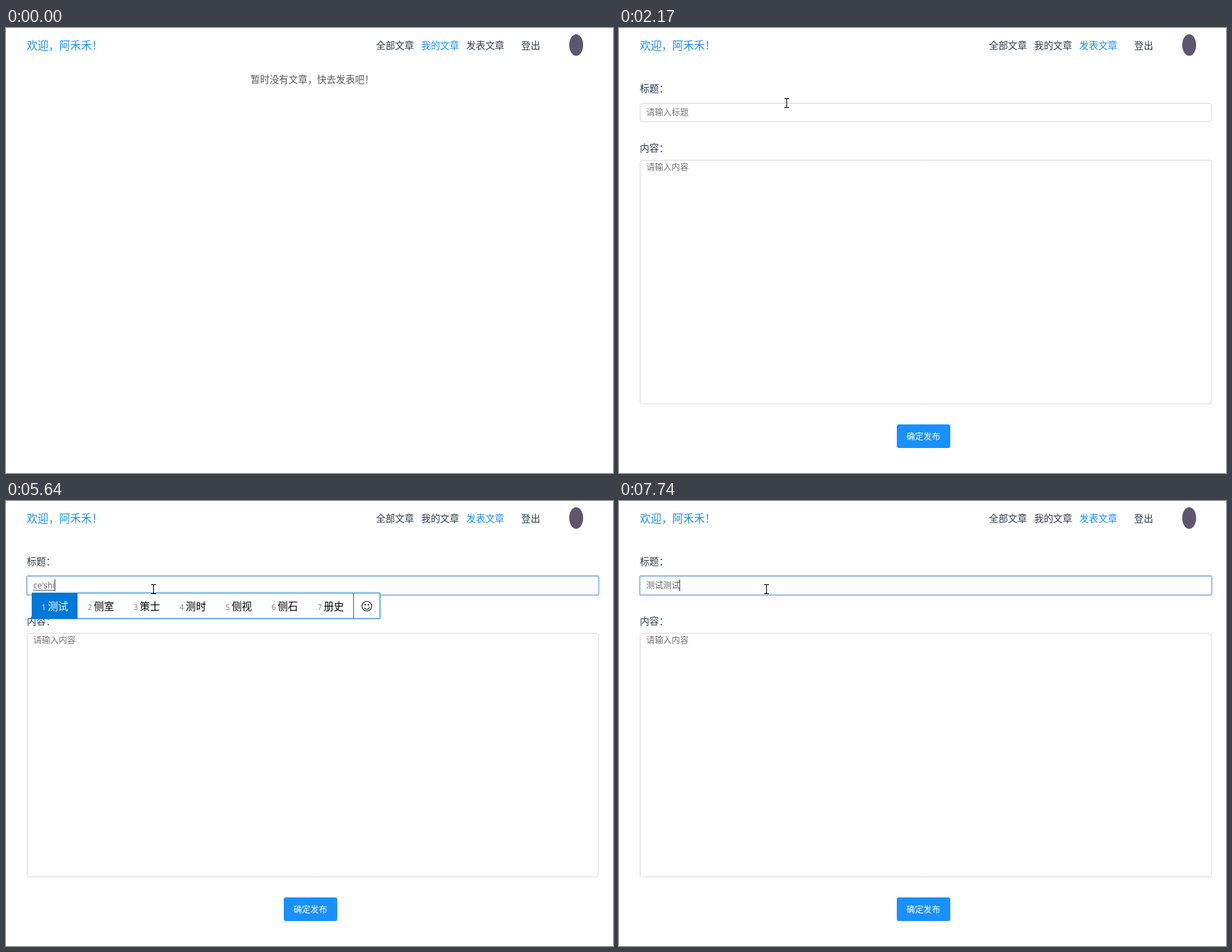
An HTML page with a canvas that plays this animation: 874x641 px, repeating every 8 s.

```html
<!DOCTYPE html>
<html lang="zh-CN">
<head>
<meta charset="utf-8">
<title>发表文章</title>
<style>
html, body { margin: 0; width: 100%; height: 100%; overflow: hidden; background: #fff; }
canvas { display: block; width: 874px; height: 641px; }
</style>
</head>
<body>
<canvas id="stage" width="874" height="641"></canvas>
<script>
const ctx = document.getElementById('stage').getContext('2d');
const LOOP = 8000;
const CJK = '"Noto Sans CJK SC", "Noto Sans CJK", sans-serif';
const LATIN = '"Open Sans", "Noto Sans CJK SC", sans-serif';
const BLUE = '#1890ff', DARK = '#2c3e50', GREY = '#757575', IME_BLUE = '#0078d7';

const BODY = 13.7, SMALL = 12.2, CAND = 14.6;
const FIELD_X = 39.2, NAV_Y = 25;

const ONE = [...'从才成吃出次错'];
const CE = [...'测侧册策厕恻齰'];
const CE_S = '测试 厕所 测算 侧身 测速 策士 侧室'.split(' ');
const CE_SH = '测试 侧身 策士 侧室 测时 侧视 册数'.split(' ');
const CE_SHI = '测试 侧室 策士 测时 侧视 侧石 册史'.split(' ');

// start time, committed text, text being composed, candidates
const TYPING = [
  [0, '', '', null],
  [3950, '', 'c', ONE],
  [4940, '', 'ce', CE],
  [5110, '', "ce's", CE],
  [5180, '', "ce's", CE_S],
  [5500, '', "ce'sh", CE_SH],
  [5640, '', "ce'shi", CE_SHI],
  [5960, '测试', '', null],
  [6970, '测试', 'c', ONE],
  [7110, '测试', 'ce', CE],
  [7360, '测试', "ce's", CE_S],
  [7740, '测试测试', '', null]
];
const CARET_OFF = [[3090, 3620], [4480, 4940], [6500, 6970]];

const within = (t, a, b) => t >= a && t < b;

// y is the visual middle of the line
function text(str, x, y, size, color, family = CJK) {
  ctx.font = `${size}px ${family}`;
  ctx.fillStyle = color;
  ctx.fillText(str, x, Math.round(y + size * 0.38));
  return ctx.measureText(str).width;
}

function rect(x, y, w, h, color) {
  ctx.fillStyle = color;
  ctx.fillRect(x, y, w, h);
}

function frame(x, y, w, h, r, color, line) {
  ctx.beginPath();
  ctx.roundRect(x, y, w, h, r);
  ctx.strokeStyle = color;
  ctx.lineWidth = line;
  ctx.stroke();
}

function header(onForm, hover) {
  text('欢迎，阿禾禾！', 30, 25.5, 15.6, BLUE);
  text('全部文章', 532.7, NAV_Y, BODY, DARK);
  text('我的文章', 597.7, NAV_Y, BODY, onForm ? DARK : BLUE);
  text('发表文章', 662.8, NAV_Y, BODY, onForm || hover ? BLUE : DARK);
  text('登出', 741.8, NAV_Y, BODY, DARK);
  ctx.beginPath();
  ctx.ellipse(821, 24.5, 10, 15.5, 0, 0, Math.PI * 2);
  ctx.fillStyle = '#5d566e';
  ctx.fill();
}

function candidates(list, x) {
  const itemW = 37 + CAND * list[0].length;
  const y = 132, h = 38;
  const sep = Math.round(x + itemW * list.length);
  const w = sep - x + 39;
  rect(x, y, w, h, '#fff');
  frame(x + 0.5, y + 0.5, w - 1, h - 1, 0, IME_BLUE, 1);
  rect(x, y, Math.round(itemW), h, IME_BLUE);
  list.forEach((word, i) => {
    const left = x + i * itemW;
    text(i + 1, left + 14.5, 153, 10.5, i ? GREY : '#fff', LATIN);
    text(word, left + 23.2, 151.5, CAND, i ? '#000' : '#fff');
  });
  rect(sep, y, 1, h, IME_BLUE);

  const cx = sep + 19.5, cy = 151.5;
  ctx.strokeStyle = '#222';
  ctx.lineWidth = 1.2;
  ctx.beginPath();
  ctx.arc(cx, cy, 7, 0, Math.PI * 2);
  ctx.moveTo(cx + 3.6, cy + 2);
  ctx.arc(cx, cy + 0.6, 3.9, 0.36, Math.PI - 0.36);
  ctx.stroke();
  rect(cx - 3.3, cy - 3, 2, 2, '#222');
  rect(cx + 1.3, cy - 3, 2, 2, '#222');
}

function form(t) {
  const focus = t >= 2540;
  text('标题：', 30, 87, BODY, DARK);
  text('内容：', 30, 173, BODY, DARK);
  if (focus) frame(30, 108, 823.5, 27.5, 2, '#94b8ef', 1.8);
  else frame(30.5, 108.5, 822.5, 26.5, 3, '#d9d9d9', 1);
  frame(30.5, 190.5, 822.5, 351, 3, '#d9d9d9', 1);
  text('请输入内容', FIELD_X, 200.8, SMALL, GREY);

  ctx.beginPath();
  ctx.roundRect(400, 571, 77, 34, 3);
  ctx.fillStyle = BLUE;
  ctx.fill();
  text('确定发布', 414, 588.7, SMALL, '#fff');

  const [, done, comp, list] = TYPING.findLast(s => t >= s[0]);
  let x = FIELD_X;
  if (!done && !comp) text('请输入标题', x, 121.8, SMALL, GREY);
  if (done) x += text(done, x, 121.8, SMALL, '#666');
  const imeX = Math.floor(x) - 2;
  if (comp) {
    const w = text(comp, x, 121.8, SMALL, '#666', LATIN);
    rect(Math.floor(x), 128, Math.round(w), 1, '#666');
    x += w;
  }
  if (focus && !CARET_OFF.some(([a, b]) => within(t, a, b)))
    rect(Math.floor(x), 113, 1, 17, '#444');
  if (list) candidates(list, imeX);
}

// The pointer advances in discrete steps, like a screen recording.
function pointer(t) {
  const step = (start, len, last) => Math.min(last, Math.floor((t - start) / len)) / last;
  if (t < 1690) {
    const k = 1 - step(440, 79, 10);
    return { x: 693 + 113 * k ** 1.6, y: 31 + 597 * k ** 2 };
  }
  const k = 1 - step(1690, 77.7, 9);
  return { x: 212 + 481 * k ** 2.56, y: 127 - 96 * k ** 1.47 };
}

const ARROW = new Path2D('M.5 .5V16.5L4.2 13L6.7 18.8L9.3 17.7L6.8 12H11.8Z');
const HAND = new Path2D('M4.5 12V2a1.5 1.5 0 0 1 3 0V8a1.4 1.4 0 0 1 2.7 .3' +
  'a1.4 1.4 0 0 1 2.6 .6a1.3 1.3 0 0 1 2.4 1V14.5C15.2 16.5 13.8 17.5 13.6 19.8' +
  'H5.8C5.4 17 2.2 14.8 1 12.2C.2 10.2 2 9.3 3.2 10.6Z');
const KNUCKLES = new Path2D('M7.5 8V10.8M10.2 8.5V11M12.8 9V11.3');

function cursor(p, kind) {
  ctx.save();
  ctx.translate(Math.round(p.x), Math.round(p.y));
  ctx.lineWidth = 1;
  ctx.strokeStyle = '#000';
  ctx.fillStyle = '#fff';
  if (kind === 'beam') {
    rect(0, -7, 1, 14, '#000');
    for (const y of [-7, 6]) {
      rect(-3, y, 3, 1, '#000');
      rect(1, y, 3, 1, '#000');
    }
  } else if (kind === 'hand') {
    ctx.translate(-5, 0);
    ctx.fill(HAND);
    ctx.stroke(HAND);
    ctx.stroke(KNUCKLES);
  } else {
    ctx.fill(ARROW);
    ctx.stroke(ARROW);
  }
  ctx.restore();
}

function draw(t) {
  rect(0, 0, 874, 641, '#fff');
  const onForm = t >= 1690;
  const p = pointer(t);
  const onLink = t >= 440 && p.y < 36 && within(p.x, 663, 719);
  header(onForm, onLink);
  if (onForm) form(t);
  else text('暂时没有文章，快去发表吧！', 352, 74, BODY, '#595959');

  if (t < 440) return;
  if (within(t, 1370, 1450) || within(t, 2540, 2660)) {
    ctx.beginPath();
    ctx.arc(p.x, p.y, 10, 0, Math.PI * 2);
    ctx.fillStyle = 'rgba(255,255,0,.47)';
    ctx.fill();
  }
  cursor(p, onLink ? 'hand' : onForm && p.y >= 107 ? 'beam' : 'arrow');
}

function tick() {
  draw(performance.now() % LOOP);
  requestAnimationFrame(tick);
}
tick();
</script>
</body>
</html>
```
